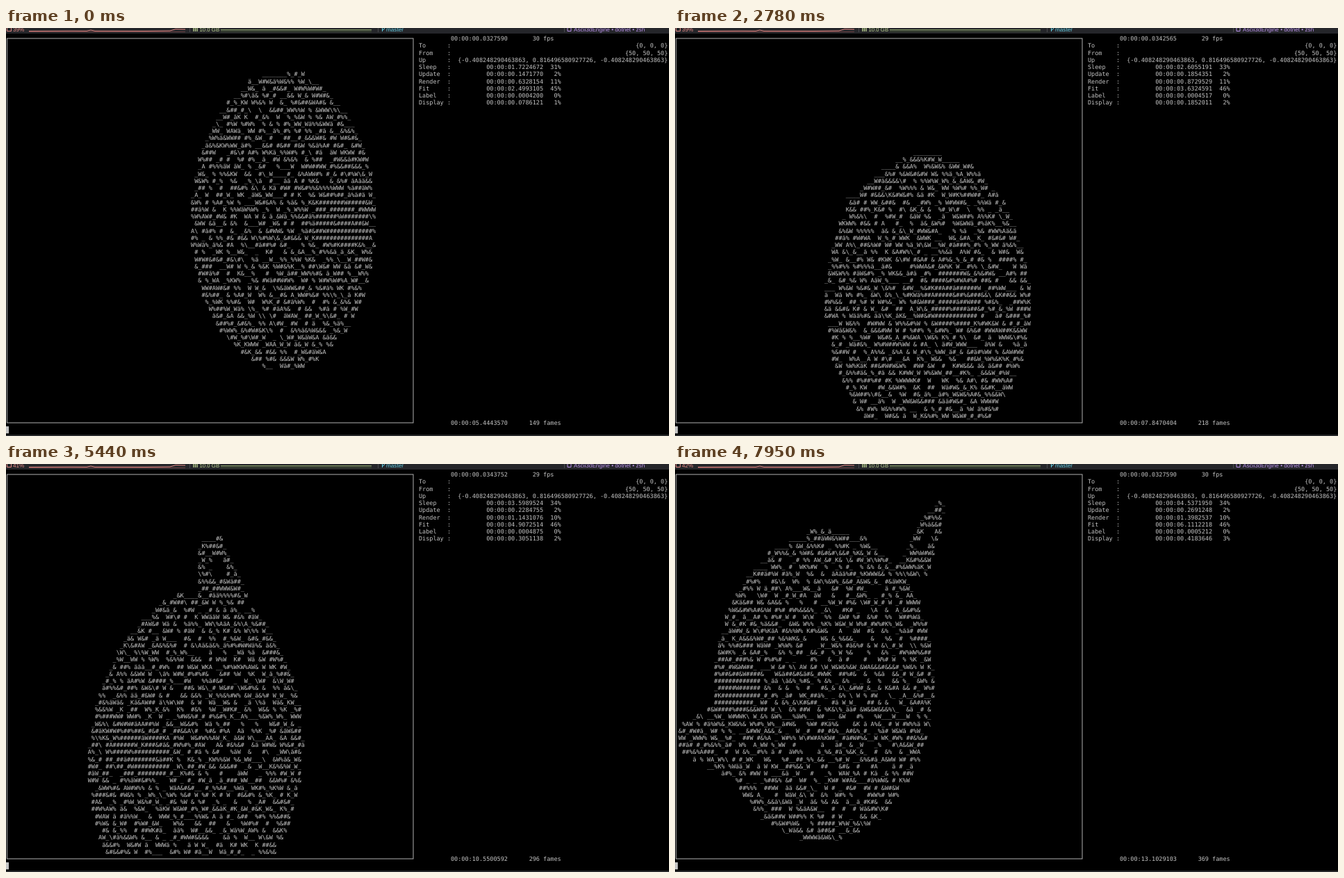
Animation, 954 px wide and 587 px high, one loop 8 s. Source, as an HTML page:

```html
<!DOCTYPE html>
<html lang="en">
<head>
<meta charset="utf-8">
<title>ASCII 3D</title>
<style>
html, body { margin: 0; width: 100%; height: 100%; overflow: hidden; background: #000; }
svg { display: block; width: 954px; height: 587px; }
.term { font: 8.505px "DejaVu Sans Mono", monospace; fill: #c2c2c2; white-space: pre; text-rendering: geometricPrecision; }
.bar { font: 8.2px "Liberation Sans", sans-serif; text-rendering: geometricPrecision; }
</style>
</head>
<body>
<svg viewBox="0 0 954 587">
  <rect width="954" height="587"/>
  <g class="bar">
    <rect width="954" height="8" fill="#25262a"/>
    <path d="M264.5 0V6M535.5 0V6M803.5 0V6" stroke="#4a4b50"/>
    <g fill="#e58a86">
      <path d="M1.5 -2H7.5V4.5H1.5Z" fill="none" stroke="#e58a86"/>
      <text id="cpu" x="10" y="5"/>
      <path d="M33 4.5L95 4.2 116 4.3 122 3 128 4.3 200 4.4 236 4 244 1.7 258 2" fill="none" stroke="#e58a86"/>
      <path d="M33 5.5H258" stroke="#8a4c4c" stroke-width=".7"/>
    </g>
    <g fill="#bfd693">
      <path d="M270 0V5M272.5 0V5M275 0V5" stroke="#bfd693" stroke-width="1.3"/>
      <text id="mem" x="278.5" y="5" font-size="7.8"/>
      <path d="M309 2.8H526" stroke="#a4c47c"/>
      <path d="M309 5.3H526" stroke="#50663c" stroke-width=".7"/>
    </g>
    <g fill="#62cbe0">
      <path d="M541.5 0V5M544.5 0Q544.5 2.5 541.5 3" fill="none" stroke="#62cbe0"/>
      <text x="547" y="5">master</text>
    </g>
    <g fill="#b890e8">
      <path d="M808 0V4.5H813V0" fill="none" stroke="#b890e8"/>
      <text x="817" y="5">Ascii3dEngine • dotnet • zsh</text>
    </g>
  </g>
  <rect x="1.5" y="15" width="584.5" height="553" fill="none" stroke="#b0b0b0"/>
  <g class="term" id="term"></g>
  <rect id="cursor" width="5.1" height="10.2" fill="#c4c4c4"/>
  <rect y="585" width="954" height="2" fill="#26282a"/>
</svg>
<script>
const CW = 5.12, RH = 10.24, LOOP = 8000, STEP = 149, LAST = 51, NB = '\u00a0';
const GLYPHS = '#####WWWW%%%%&&&&___äA#W%&#WK%&_ä\\';
const $ = id => document.getElementById(id);

const lerp = (a, b, f) => a + (b - a) * f;
const clamp = x => Math.min(1, Math.max(0, x));
const frac = x => x - Math.floor(x);
const glyph = h => GLYPHS[Math.floor(h * GLYPHS.length)];
const clock = s => '00:00:' + s.toFixed(7).padStart(10, '0');

function hash(a, b, c) {
  let h = Math.imul(a + 11, 374761393) ^ Math.imul(b + 7, 668265263) ^ Math.imul(c + 3, 1274126177);
  h = Math.imul(h ^ (h >>> 13), 1103515245);
  h = Math.imul(h ^ (h >>> 15), 2246822519);
  return ((h ^ (h >>> 16)) >>> 0) / 4294967296;
}

// The model swings on an arc, in terminal cells; its neck turns into view on the way
function pose(k) {
  const turn = Math.PI * k / 56, swell = Math.exp(-(((k - 41) / 8) ** 2));
  const q = (k - 21) / 30;
  const cx = 59.5 + 18.5 * Math.cos(turn), cy = 25.5 + 14.5 * Math.sin(turn);
  return {
    k, q, cx, cy,
    rx: 26 + 5 * Math.sqrt(k / LAST),
    ry: 21 + 4.5 * swell,
    lean: .2 * swell,
    spout: 12 * clamp((k - 42) / 9),
    tip: { x: 58 - 14 * q + 30 * q * q, y: 17 - 13 * Math.sin(q * Math.PI / 2) },
    base: { x: 58 + 8 * q, y: 21 - 7 * q },
    patch: { x: cx - 5 + 21 * Math.cos(Math.PI * k / LAST), y: cy }
  };
}

function bodySpan(p, row) {
  const d = (row - p.cy) / p.ry;
  if (Math.abs(d) >= 1) return null;
  const half = p.rx * Math.sqrt(1 - d * d), mid = p.cx - p.lean * (row - p.cy);
  const spout = p.spout * Math.max(0, 1 - ((row - 37.5) / 5) ** 2);
  return { v: (d + 1) / 2, l: Math.max(1, Math.round(mid - half - spout)), r: Math.round(mid + half) };
}

function neckSpan(p, row) {
  const v = (row - p.tip.y) / (p.base.y - p.tip.y);
  if (p.base.y <= p.tip.y || v < -.05 || v > 1) return null;
  const w = clamp(v), half = (9 - 4 * p.q) * (.3 + .7 * Math.sqrt(w));
  const mid = lerp(p.tip.x, p.base.x, w);
  return { v: w, l: Math.round(mid - half), r: Math.round(mid + half) };
}

const has = (s, c) => s && c >= s.l && c < s.r;

// Wire mesh: meridians crowd at the sides, rings run across, a dense patch rides along
function bodyChar(p, s, c, row) {
  const k = p.k, h = hash(c, row, k), g = hash(row, c, k + 90);
  const far = ((c - p.patch.x) / 8) ** 2 + ((row - p.patch.y) / 4) ** 2;
  if (far < 1) return h < .75 ? '#' : glyph(g);
  const x = 2 * (c + .5 - s.l) / (s.r - s.l) - 1, z = Math.sqrt(1 - x * x);
  const width = 12 / ((s.r - s.l) * Math.max(z, .15));
  if (frac(Math.asin(x) * 6 + s.v * 5 + k * .13) < width * 1.5) return h < .95 ? glyph(g) : NB;
  if (frac(s.v * 14 + z * 2.5 + x - k * .17) < .4) return h < .9 ? (g < .25 ? '_' : glyph(frac(g * 7))) : NB;
  return h < .18 + .6 * Math.exp(-far / 9) ? glyph(g) : NB;
}

function neckChar(p, s, c, row) {
  const u = (c + .5 - s.l) / (s.r - s.l);
  if (s.v > .3 && s.v < .65 && u > .36 && u < .7) return NB;
  return hash(c, row, p.k) < .95 ? glyph(hash(row, c, p.k + 40)) : NB;
}

function drawRow(p, row) {
  const body = bodySpan(p, row), neck = neckSpan(p, row);
  const above = [bodySpan(p, row - 1), neckSpan(p, row - 1)];
  let line = '';
  for (let c = 0; c < 114; c++) {
    const inBody = has(body, c);
    if (!inBody && !has(neck, c)) line += NB;
    else if (row < p.cy && !above.some(s => has(s, c)) && hash(c, row, p.k + 5) < .7) line += '_';
    else line += inBody ? bodyChar(p, body, c, row) : neckChar(p, neck, c, row);
  }
  return line;
}

const term = $('term');
function addText(col, row, s = '') {
  const el = document.createElementNS('http://www.w3.org/2000/svg', 'text');
  el.setAttribute('x', col * CW);
  el.setAttribute('y', 18.1 + row * RH);
  el.textContent = s;
  return term.appendChild(el);
}

// Seconds spent per stage, at the start and the end of the loop
const stages = {
  Sleep: [1.7224672, 4.5371950],
  Update: [.1471770, .2691248],
  Render: [.6328154, 1.3982537],
  Fit: [2.4993105, 6.1112218],
  Label: [.0004200, .0005212],
  Display: [.0786121, .4183646]
};
const names = Object.keys(stages);
['To', 'From', 'Up', ...names].forEach((s, i) => {
  addText(116, i + 1, s);
  addText(124, i + 1, ':');
});
addText(177, 1, '{0, 0, 0}');
addText(174, 2, '{50, 50, 50}');
addText(127, 3, '{-0.408248290463863, 0.816496580927726, -0.408248290463863}');

const art = Array.from({ length: 53 }, (_, i) => addText(0, i + 1));
const times = names.map((_, i) => addText(135, i + 4));
const frameTime = addText(125, 0), fps = addText(148, 0);
const totalTime = addText(125, 54), fames = addText(147, 54);

function draw(k) {
  const p = pose(k), f = k / LAST;
  art.forEach((el, i) => { el.textContent = drawRow(p, i + 1); });

  const delta = .0338365 - .0010775 * Math.cos(2 * Math.PI * f);
  const total = lerp(5.4443570, 13.1029103, f);
  frameTime.textContent = clock(delta);
  fps.textContent = Math.floor(1 / delta) + ' fps';
  totalTime.textContent = clock(total);
  fames.textContent = Math.round(lerp(149, 369, f)) + ' fames';
  names.forEach((s, i) => {
    const spent = lerp(...stages[s], f), share = Math.floor(spent / total * 99.7) + '%';
    times[i].textContent = clock(spent) + share.padStart(5, NB);
  });

  $('cpu').textContent = 39 + Math.floor(k / 17) + '%';
  $('mem').textContent = ((k + 5) % 17 < 9 ? '10.0' : '10') + ' GB';

  // Now and then the cursor is caught while the screen is being written
  const caught = k > 20 && k % 12 === 5, n = (k - 29) / 12;
  $('cursor').setAttribute('x', (caught ? 44 + 52 * n : -.2) * CW);
  $('cursor').setAttribute('y', 9.9 + (caught ? 24 + 10 * n : 55) * RH);
}

let shown = -1;
const start = performance.now();
function tick() {
  const t = (performance.now() - start) % LOOP;
  const k = t < 500 ? 0 : Math.min(LAST, 1 + Math.floor((t - 480) / STEP));
  if (k !== shown) draw(shown = k);
  requestAnimationFrame(tick);
}
tick();
</script>
</body>
</html>
```
